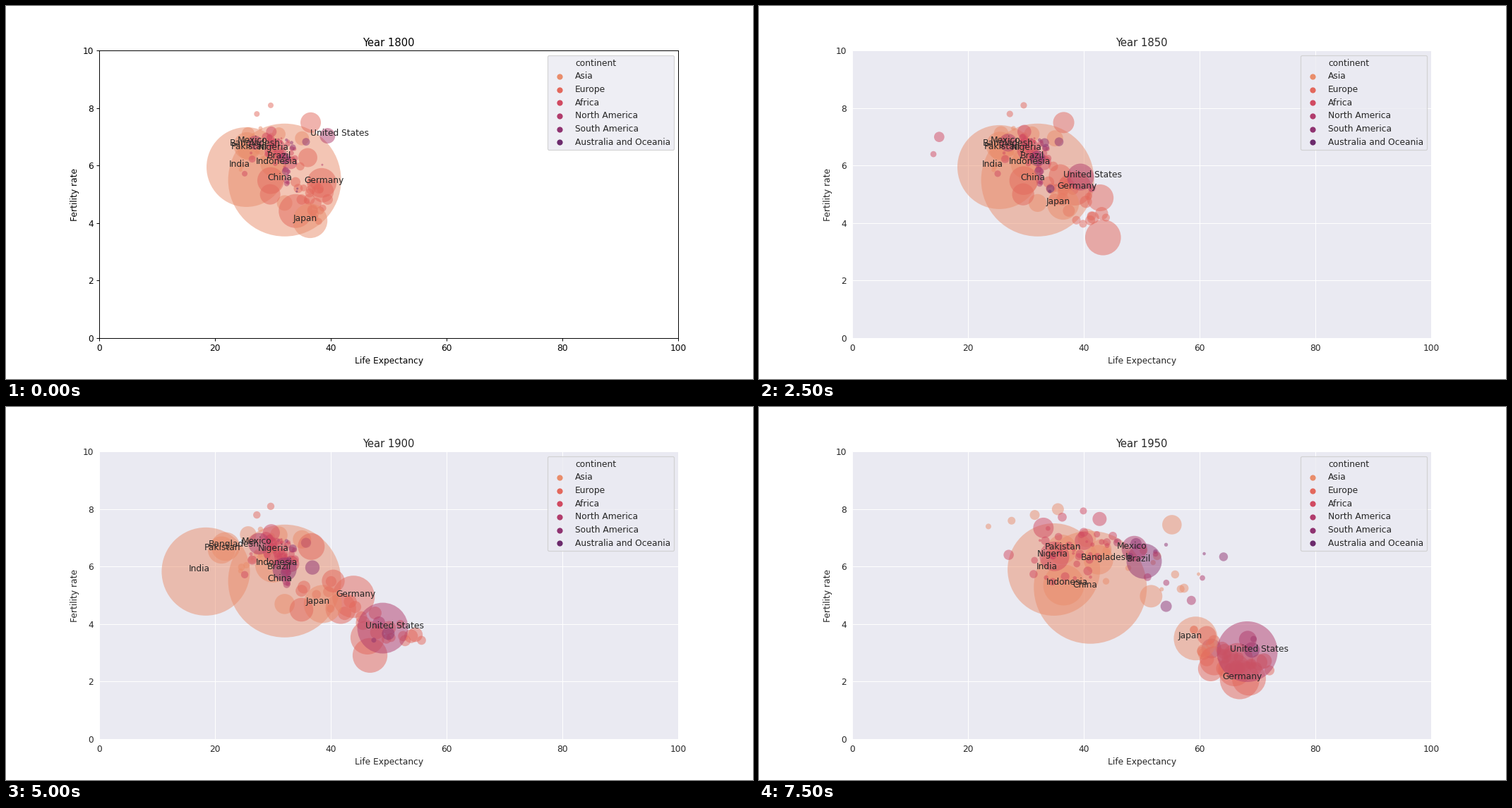
Animation, 1058 px wide and 529 px high, one loop 8000 ms. Source, as a matplotlib script:

```python
import numpy as np
import matplotlib.pyplot as plt
from matplotlib.animation import FuncAnimation

W, H = 1058, 529
DPI = W / 12
LAST = 15  # final decade after 1800
INK = "0.15"
PANEL = "#EAEAF2"

CONTINENTS = ["Asia", "Europe", "Africa", "North America",
              "South America", "Australia and Oceania"]
COLORS = ["#e98d6b", "#e3685c", "#d14a61", "#b13c6c", "#8f3371", "#6c2b6d"]
AS, EU, AF, NA, SA, OC = range(6)

rng = np.random.default_rng(7)
bubbles = []


def track(group, size, *path, name=None, dips={}):
    """size: diameters in px spread evenly over time; path: (decade, x, y);
    dips: sudden one-decade changes of life expectancy."""
    t, x, y = zip(*path)
    size_t = np.linspace(0, LAST, len(size))

    def at(step):
        return (np.interp(step, t, x) + dips.get(step, 0),
                np.interp(step, t, y), np.interp(step, size_t, size))
    bubbles.append((group, at, name))


def ease(group, size, start, end, begin, power=1.4):
    """Wait at start until the given decade, then speed up towards end."""
    a, b = np.array(start), np.array(end)

    def at(step):
        k = np.clip((step - begin) / (LAST - begin), 0, 1) ** power
        return *(a + (b - a) * k), size * (1 + 0.03 * step)
    bubbles.append((group, at, None))


def crowd(group, count, center, spread, x_end, y_end, noise):
    """Small countries leaving a crowd for places along a line."""
    for u in rng.permutation(np.linspace(0, 1, count)):
        end = (np.interp(u, (0, 1), x_end), np.interp(u, (0, 1), y_end))
        ease(group, rng.uniform(2.5, 9), rng.normal(center, spread),
             rng.normal(end, noise), 11.5)


def ladder(count):
    """European countries: the earlier the start, the further the move."""
    for u in np.linspace(0, 1, count):
        start = rng.normal((38.5 - 3.5 * u, 4.3 + 1.2 * u), (1, 0.3))
        end = rng.normal((71 - 11 * u, 2.4 + 0.8 * u), (0.8, 0.25))
        ease(EU, rng.uniform(8, 16), start, end, 9.5 * u, 1.6)


def build():
    # Asian giants and neighbours
    track(AS, (38, 42), (7, 25.5, 6.7), (10, 21.8, 6.7), (12, 23.95, 6.7),
          (15, 42.5, 6.24), name="Bangladesh")
    track(AS, (160,), (12, 32, 5.5), (15, 41.1, 5.28), name="China")
    track(AS, (113, 122, 131), (7, 25.4, 5.95), (12, 24.7, 5.75),
          (15, 34.8, 5.9), name="India", dips={10: -6.6})
    track(AS, (36, 58), (10, 30, 6.07), (12, 30, 5.48), (15, 36.5, 5.36),
          name="Indonesia")
    track(AS, (32, 42), (7, 25.8, 6.58), (10, 21.1, 6.58), (12, 25.6, 6.58),
          (15, 36.2, 6.6), name="Pakistan")
    ease(AS, 22, (32, 4.7), (51.6, 4.97), 12)
    ease(AS, 18, (25.7, 7.12), (40.5, 7), 12)
    ease(AS, 20, (35, 6.95), (43, 6.6), 12)
    ease(AS, 19, (31, 7.1), (55.2, 7.46), 12)
    for i in range(4):
        track(AS, (5, 8 + 3 * i), (12, 24.4 + i, 5.85 + 0.2 * i),
              (15, 23.5 + 4 * i, 7.4 + 0.2 * i), dips={12: i - 9.2})
    crowd(AS, 12, (29.5, 6.5), (2.6, 0.4), (44, 60), (7, 5.2), (1, 0.6))

    # Africa
    track(AF, (31, 33, 42), (12, 30.4, 6.56), (15, 34.9, 6.36),
          name="Nigeria")
    track(AF, (15, 29), (12, 29.7, 7.18), (15, 33, 7.35), dips={9: -26})
    track(AF, (12, 20), (12, 28.8, 7), (15, 42.7, 7.66),
          dips={5: -13.8, 6: -12, 7: -6.8})
    track(AF, (8, 10), (12, 29, 6.4), (15, 39.9, 7.94),
          dips={2: -22.4, 5: -15})
    ease(AF, 18, (33.1, 6.1), (40, 6.9), 12)
    ease(AF, 10, (26.4, 6.23), (27, 6.41), 12)
    ease(AF, 8, (25.1, 5.72), (31.3, 5.74), 12)
    crowd(AF, 36, (31.4, 6.6), (1.6, 0.3), (32, 45), (6.3, 6.9), (1, 0.55))

    # Latin America
    track(SA, (17, 22, 34, 50), (7, 32, 6.25), (10, 32, 5.9),
          (12, 32.1, 5.92), (15, 50.4, 6.19), name="Brazil")
    track(NA, (20, 36), (7, 26.9, 6.8), (10, 27.6, 6.8), (12, 31.9, 5.8),
          (15, 48.7, 6.63), name="Mexico")
    track(SA, (5, 28), (8, 33.2, 6.8), (10, 36.8, 5.97), (15, 62, 3.15))
    ease(SA, 11, (35.7, 6.83), (49, 6.8), 12)
    ease(SA, 11, (32.2, 5.8), (54.2, 4.62), 12)
    crowd(SA, 5, (32.5, 6.3), (1, 0.5), (48, 64), (6.6, 6.3), (1, 0.2))
    crowd(NA, 7, (32.6, 6), (1.2, 0.6), (46, 60), (6.8, 4.8), (1, 0.4))

    # Europe and Japan
    for y in (7.8, 8.1):
        ease(EU, 8, (8 * y - 35.2, y), (59, 3.8), 11.5)
    ladder(22)
    track(EU, (48, 52, 44), (0, 33.9, 4.42), (1, 37.4, 3.9), (5, 43.3, 3.5),
          (7, 36.4, 3.44), (8, 42, 3.32), (12, 51.5, 2.5), (15, 66.5, 2.8))
    track(EU, (42, 48, 60, 56), (1, 38.4, 5.4), (7, 38.4, 5.1),
          (10, 43.9, 4.95), (12, 53.5, 2.4), (13, 60.5, 1.9),
          (15, 66.9, 2.07), name="Germany")
    track(EU, (38, 46), (5, 29.6, 5.48), (7, 29.7, 4.9), (10, 41.7, 4.54),
          (12, 45.5, 3.42), (15, 66, 2.4))
    track(AS, (49, 45, 54, 62), (0, 36.4, 4.08), (5, 36.4, 4.67),
          (7, 36.6, 3.83), (10, 38.6, 4.7), (12, 42, 5.36), (15, 59.3, 3.5),
          name="Japan")
    track(EU, (27, 35, 27), (0, 36, 6.28), (5, 35.9, 5.65), (7, 36, 6.16),
          (10, 40.4, 5.5), (12, 46.5, 4.7), (15, 61.2, 3.6))
    track(EU, (29, 36), (7, 29.5, 5), (10, 34.9, 4.5), (12, 39.4, 4.15),
          (15, 61.9, 2.45))
    track(EU, (29, 30, 38, 41), (7, 36.5, 7.5), (10, 36.6, 6.7),
          (12, 28, 5.38), (15, 62.5, 2.72))
    track(EU, (31, 38, 48, 48), (0, 38.6, 5.1), (5, 42.8, 4.88),
          (7, 40.9, 4.88), (10, 46.3, 3.53), (12, 57.5, 3.1),
          (14, 61, 1.72), (15, 68.5, 2.1))

    # English-speaking settlers
    track(OC, (3, 16, 22), (7, 34.2, 5.2), (10, 49.9, 3.67),
          (12, 60.6, 3.08), (15, 69, 3.1))
    track(OC, (3, 9), (7, 34.1, 5.1), (10, 47.4, 3.44), (15, 69.3, 3.48))
    track(NA, (3, 25), (0, 38.5, 6.03), (7, 42.5, 4.88), (10, 48.3, 4.05),
          (15, 68.3, 3.46))
    track(NA, (22, 38, 72, 86), (0, 39.4, 7.04), (7, 39.4, 5.03),
          (10, 48.95, 3.86), (12, 55.4, 3.27), (15, 68.2, 3.04),
          name="United States")


def style(plain):
    ink = "black" if plain else INK
    ax.set_facecolor("white" if plain else PANEL)
    ax.set_axisbelow(True)
    if plain:
        ax.grid(False)
    else:
        ax.grid(True, color="white", lw=0.8)
    for spine in ax.spines.values():
        spine.set_edgecolor("black" if plain else "white")
    ax.tick_params(color=ink if plain else "none", labelcolor=ink)
    ax.set(xlim=(0, 100), ylim=(0, 10))
    ax.set_xlabel("Life Expectancy", color=ink)
    ax.set_ylabel("Fertility rate", color=ink, labelpad=3.2)
    return ink


def draw_legend():
    handles = [ax.scatter([], [], s=0, label="continent")]
    handles += [ax.scatter([], [], s=45, color=c, lw=0, label=n)
                for n, c in zip(CONTINENTS, COLORS)]
    ax.legend(handles=handles, loc="upper right", facecolor=PANEL,
              edgecolor="0.8", framealpha=0.8, labelcolor=INK,
              labelspacing=0.463)


def update(step):
    ax.clear()
    ink = style(step == 0)
    ax.set_title(f"Year {1800 + 10 * step}", color=ink, pad=5.5)
    x, y, d = np.array([at(step) for _, at, _ in bubbles]).T
    ax.scatter(x, y, s=(d * 72 / DPI) ** 2, alpha=0.5, lw=0,
               c=[COLORS[g] for g, _, _ in bubbles])
    for px, py, (_, _, name) in zip(x, y, bubbles):
        if name:
            ax.text(px - 3, py, name, color=INK)
    draw_legend()


plt.rcParams["font.family"] = "DejaVu Sans"
fig, ax = plt.subplots(figsize=(W / DPI, H / DPI), dpi=DPI)
build()
anim = FuncAnimation(fig, update, frames=LAST + 1,
                     init_func=lambda: update(0), interval=500,
                     repeat=True, repeat_delay=0)
plt.show()
```
